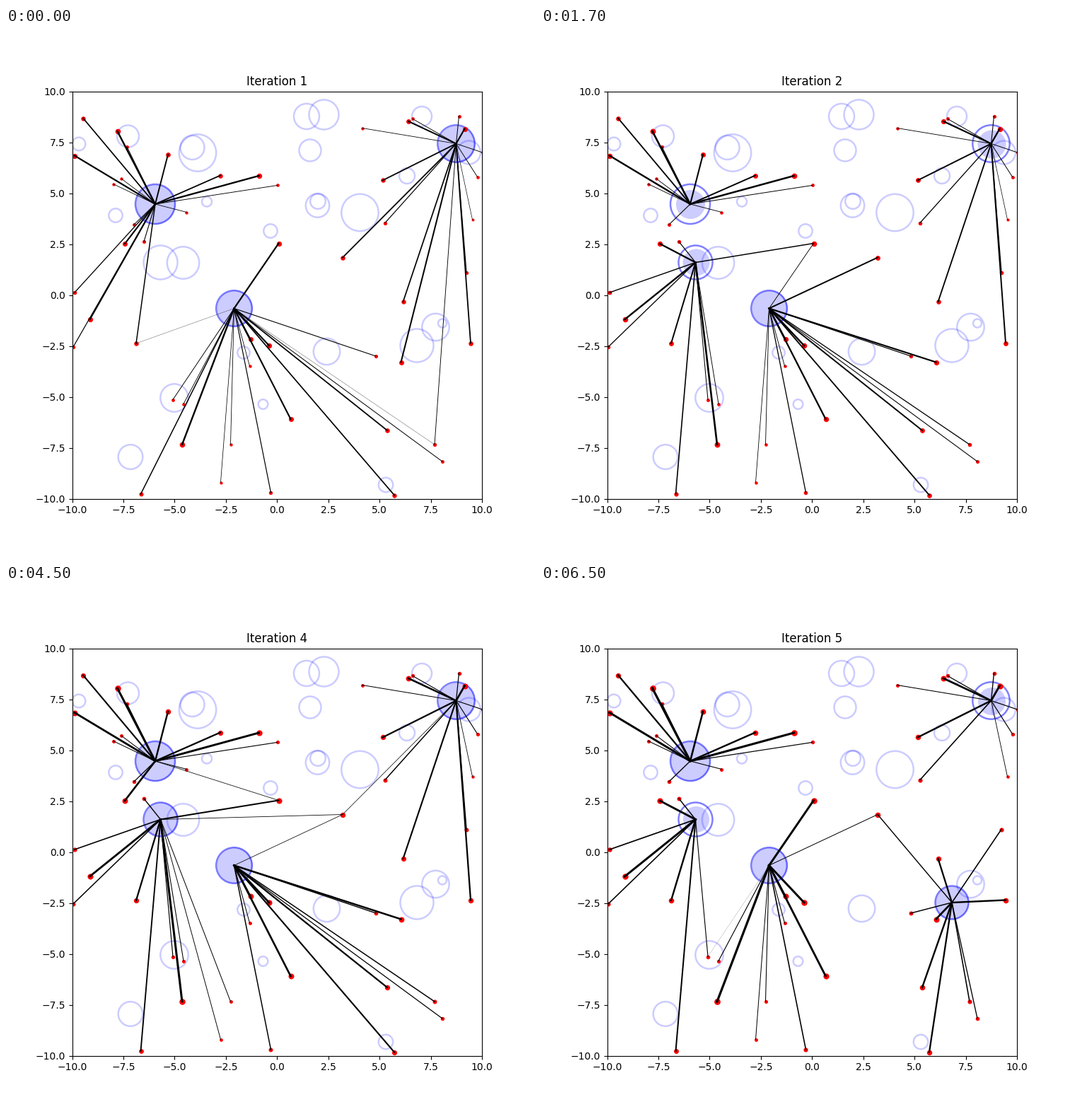
Write a matplotlib script that moves like this. It is 748 by 748 pixels and loops after 8 s.

```python
import matplotlib.pyplot as plt
from matplotlib.animation import FuncAnimation

SIZE = 748
DPI = 100
PX = 72 / DPI            # points per pixel
FRAMES = 16
GROWTH = 0.085           # demand growth per iteration

# Facilities: x, y, ring radius, used radius at each iteration (0 = closed)
FACILITIES = {
    "A": (211, 249, 28, (28, 20.5, 22, 28, 28)),
    "B": (322.5, 396.5, 25.3, (25.3,) * 5),
    "C": (636.5, 163.5, 26.2, (26.2, 20, 26.2, 26.2, 19.5)),
    "D": (218.5, 331.5, 24, (0, 19, 24, 24, 18.5)),
    "E": (581, 449, 23.5, (0, 0, 0, 0, 23.5)),
}

# Unused sites: x, y, radius
SITES = [
    (103, 164, 9.3), (172.5, 153, 15.5), (263.5, 169, 17), (271, 176.5, 26.2),
    (284, 245.5, 7), (155, 265, 9.7), (250.5, 332, 22.7), (374, 287, 9.7),
    (425, 125, 18), (449.5, 122.5, 21), (430, 173, 15.5), (440.5, 251, 16.7),
    (441, 245, 10.8), (500.5, 261, 26.2), (588, 125, 14), (654.5, 176, 16.5),
    (567, 209, 11), (336, 459, 8.7), (453.5, 457.5, 18.7), (607.5, 423, 19.2),
    (617, 417.5, 6), (238, 523, 19.7), (176, 606.5, 17.3), (363.5, 532, 6.8),
    (537, 646, 10.2),
]

# Customers: x, y, demand, serving facility at each iteration
CUSTOMERS = [
    (109, 127.5, 1.7, "AAAAA"), (157.5, 146, 2.4, "AAAAA"),
    (171, 168, 1.0, "AAAAA"), (97, 180.5, 2.2, "AAAAA"),
    (163, 213, 0.8, "AAAAA"), (151.5, 220.5, 0.8, "AAAAA"),
    (229, 179, 1.9, "AAAAA"), (303, 208.5, 1.8, "AAAAA"),
    (357.5, 209, 2.3, "AAAAA"), (383.5, 222.5, 0.9, "AAAAA"),
    (255.5, 260.5, 0.8, "AAAAA"), (181, 278, 1.0, "AAAAA"),
    (168, 305, 2.1, "ADDAD"), (195, 302, 1.1, "ADDDD"),
    (97, 374, 1.3, "ADDDD"), (118.5, 412, 2.2, "ADDDD"),
    (95, 451, 1.2, "ADDDD"), (184, 446, 1.8, "ADDDD"),
    (385.5, 304.5, 2.2, "BDDDB"), (345.5, 440, 2.0, "BBBBB"),
    (372, 449, 2.2, "BBBBB"), (344.5, 478, 0.8, "BBBBB"),
    (402.5, 553, 2.1, "BBBBB"), (523, 464, 1.1, "BBBBE"),
    (539, 569, 1.8, "BBBBE"), (606, 589, 1.2, "CBBBE"),
    (617, 613, 1.0, "BBBBE"), (549, 660.5, 1.7, "BBBBE"),
    (374.5, 657, 1.2, "BBBBB"), (303.5, 642.5, 0.75, "BBBDB"),
    (317.5, 589, 0.8, "BBBDB"), (249, 589, 2.4, "BDDDB"),
    (251, 531.5, 0.85, "BDDDB"), (236, 525.5, 0.95, "BDDDD"),
    (190.5, 659, 1.5, "BDDDD"),
    (503.5, 141.5, 0.8, "CCCCC"), (569, 132, 2.0, "CCCCC"),
    (575, 128.5, 0.9, "CCCCC"), (640.5, 124.5, 1.0, "CCCCC"),
    (648.5, 142.5, 2.1, "CCCCC"), (673.5, 176, 0.9, "CCCCC"),
    (666.5, 210.5, 0.9, "CCCCC"), (659.5, 271, 0.65, "CCCCC"),
    (532.5, 215.5, 1.8, "CCCCC"), (476, 324.5, 1.8, "CBCCE"),
    (536, 275.5, 1.2, "CCCCC"), (561.5, 387, 1.7, "CCCCE"),
    (558.5, 472.5, 2.0, "CBBBE"), (651, 345.5, 1.2, "CCCCE"),
    (657, 445.5, 1.8, "CCCCE"),
]

# Demand shared with a second facility: (iteration, customer) -> amounts
SHARED = {
    (0, 17): {"B": 0.3}, (0, 25): {"B": 0.3}, (1, 18): {"B": 0.9},
    (2, 44): {"B": 0.9}, (3, 18): {"A": 0.75}, (3, 44): {"B": 0.75, "D": 0.8},
    (4, 33): {"B": 0.15}, (4, 44): {"B": 1.0},
}

fig, ax = plt.subplots(figsize=(SIZE / DPI, SIZE / DPI), dpi=DPI)


def to_data(x, y):
    """Map stage pixels to axis units."""
    box = ax.get_position()
    return (20 * (x / SIZE - box.x0) / box.width - 10,
            20 * (1 - y / SIZE - box.y0) / box.height - 10)


def disc(x, y, radius, **style):
    ax.scatter(*to_data(x, y), s=(2 * radius * PX) ** 2, **style)


def ring(x, y, radius, alpha):
    disc(x, y, radius, facecolors="none", edgecolors="blue",
         linewidths=2.5 * PX, alpha=alpha)


def link(x, y, name, width):
    (x0, y0), (x1, y1) = to_data(*FACILITIES[name][:2]), to_data(x, y)
    ax.plot([x0, x1], [y0, y1], color="black", lw=width * PX)


def draw(frame):
    step = (frame + 3) // 4
    ax.clear()
    ax.set(xlim=(-10, 10), ylim=(-10, 10), title=f"Iteration {step + 1}")

    for site in SITES:
        ring(*site, alpha=0.2)
    for x, y, radius, used in FACILITIES.values():
        ring(x, y, radius, alpha=0.5 if used[step] else 0.2)
        if used[step]:
            disc(x, y, used[step], color="blue", alpha=0.2, linewidths=0)

    for i, (x, y, base, owners) in enumerate(CUSTOMERS):
        demand = base * (1 + GROWTH * step)
        shares = SHARED.get((step, i), {})
        disc(x, y, 2.45 * demand ** 0.5, color="red", linewidths=0)
        link(x, y, owners[step], demand - sum(shares.values()))
        for name, amount in shares.items():
            link(x, y, name, amount)


anim = FuncAnimation(fig, draw, frames=FRAMES, interval=500,
                     init_func=lambda: None, repeat=True, repeat_delay=0)
plt.show()
```
